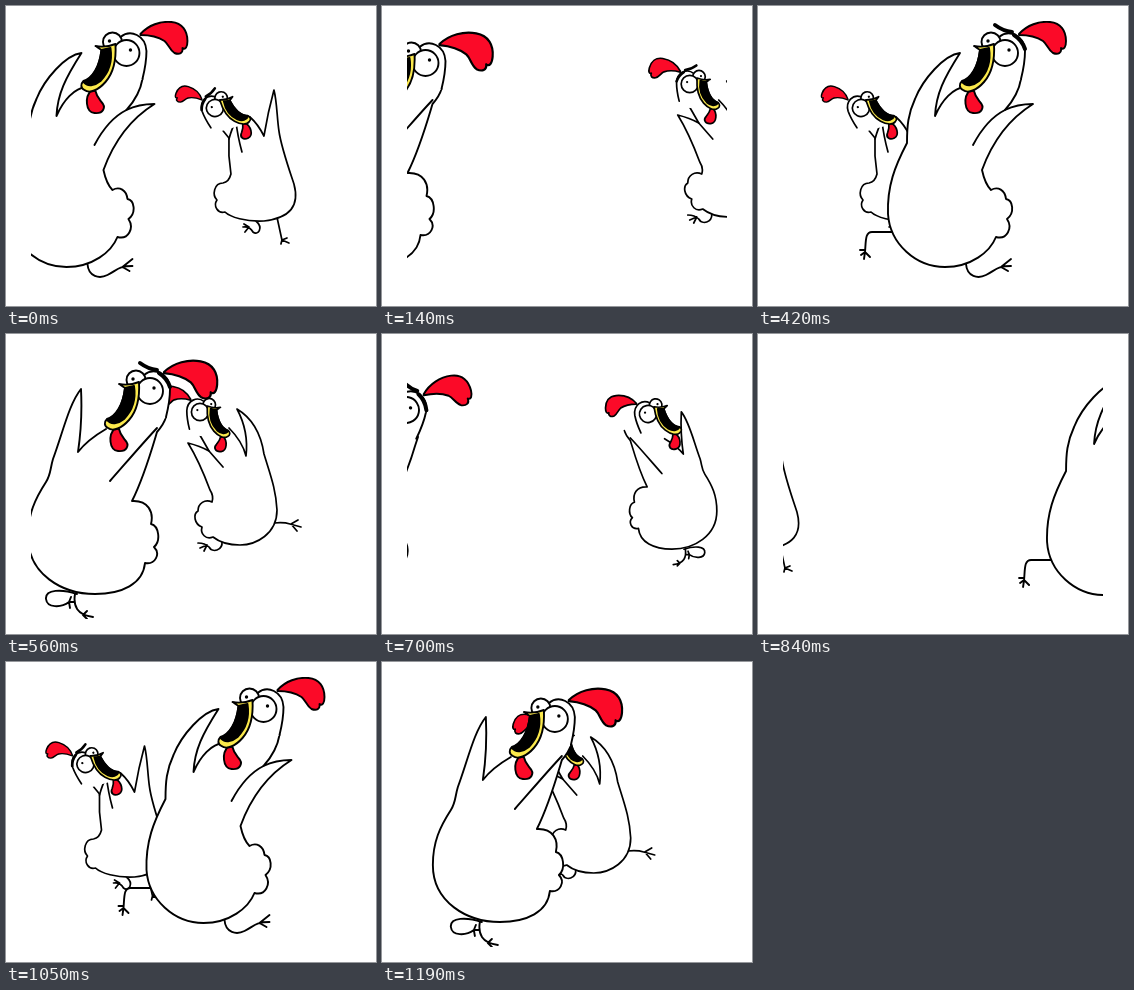
Animation of 370x300 px, one loop 1.26 s. Source, as an HTML page with a canvas:

```html
<!DOCTYPE html>
<html lang="en">
<head>
<meta charset="utf-8">
<title>Running chickens</title>
<style>
html, body { margin: 0; width: 100%; height: 100%; overflow: hidden; background: #fff; }
canvas { display: block; width: 370px; height: 300px; }
</style>
</head>
<body>
<canvas id="stage"></canvas>
<script>
const W = 370, H = 300, STEP = 70, COUNT = 18;
const RED = '#fb0a28', YELLOW = '#fbe94c', INK = '#000';
const canvas = document.getElementById('stage');
const ctx = canvas.getContext('2d');
const dpr = window.devicePixelRatio || 1;
canvas.width = W * dpr;
canvas.height = H * dpr;

const P = d => new Path2D(d);
const shape = (body, wing, legs) => ({ body: P(body), wing: P(wing), legs: P(legs) });

// Body outlines of the run cycle
const stride = shape(
  'M207,81 C195,82 184,94 177,110 C178,88 186,72 202,47 C186,49 165,73 157,93 C150,108 149,120 149,137 C137,160 129,180 130,208 C132,238 158,261 187,261 C213,261 232,246 238,231 C249,234 255,222 249,213 C257,207 255,194 248,193 C247,184 240,180 233,184 Q227,178 224,164 C232,142 246,116 275,98 C265,98 255,100 247,104 C256,94 261,85 263,73',
  'M247,104 C235,110 224,122 215,139',
  'M135,226 L114,226 C107,226 108,235 107,246 L103,249 M107,246 L106,253 M107,246 L112,251 M107,244 L102,244 M208,258 C209,271 220,273 228,269 C238,264 239,260 253,260 M243,261 L253,253 M243,261 L250,265');
const landing = shape(
  'M309,105 C298,112 290,120 282,132 C279,110 273,85 268,62 C263,80 262,105 255,130 C254,140 254,148 254,155 C240,175 232,195 232,212 C232,240 265,258 295,258 C318,258 335,252 341,246 C352,247 358,238 354,228 C361,222 360,208 352,204 C352,192 344,185 337,181 C347,162 358,140 366,112 L369,103',
  'M321,155 C330,138 340,118 350,98',
  'M259,252 Q258,265 254,279 L248,280 M254,279 L251,285 M254,279 L258,284 M290,258 C275,261 275,273 287,272 C295,272 297,267 306,268 M300,268 L301,264 M300,268 L304,271');
const push = shape(
  'M129,95 C117,102 108,109 101,118 C104,98 105,75 104,55 C92,70 86,98 76,125 C73,135 74,140 69,148 C58,165 51,180 51,203 C51,240 85,260 118,260 C145,260 166,250 168,229 C178,231 184,220 177,213 C184,207 182,192 174,190 C177,178 171,166 155,167 C167,143 174,118 180,98 Q187,90 189,83',
  'M133,147 C148,130 165,110 180,94',
  'M100,260 C85,255 68,255 69,265 C70,274 84,274 92,268 L97,268 M92,268 L94,263 M92,268 L93,274 M98,260 C96,272 100,281 116,283 M106,281 L110,277 M106,281 L110,285');
const crouch = shape(
  'M244,111 Q252,118 258,130 C261,112 265,95 268,84 C271,95 271,112 273,125 C275,140 282,160 288,178 C294,200 284,212 258,215 C240,216 224,211 219,206 C212,208 207,200 211,194 C206,189 208,177 217,177 Q223,176 225,168 L223,150 L223,132 L205,110',
  'M236,146 C233,135 231,125 230,115 Q226,122 223,133',
  'M271,211 L276,234 L283,237 M276,234 L275,238 M276,234 L281,232 M250,215 C258,222 252,230 247,226 Q244,220 237,221 M243,221 L239,226 M243,221 L238,218');
const leap = shape(
  'M223,94 C231,102 237,110 240,122 C242,105 239,90 231,75 C246,84 255,100 258,120 C264,140 270,155 271,176 C271,200 250,211 234,211 C222,211 212,207 207,203 C200,206 194,200 196,193 C188,190 187,180 192,177 C192,169 199,165 206,168 Q208,162 204,156 C198,140 192,125 182,109 Q194,112 203,117 L187,89',
  'M203,117 L217,133',
  'M268,189 Q278,188 284,190 L295,193 M285,190 L291,197 M285,190 L292,186 M216,207 C217,217 206,219 203,213 Q199,209 192,209 M201,211 L194,214 M201,211 L198,217');

// Head parts, centred on the large eye; the comb starts at its own root
const skull = 'M-6,-16 C4,-24 19,-18 20,-2 C20,10 18,18 16,26';
const head = {
  top: P(skull),
  fill: P(skull + ' L5,36 L-25,38 L-18,-10 Z'),
  comb: P('M0,0 C8,-9 20,-13 31,-12 C42,-11 47,-3 47,7 C47,13 45,16 42,14 C43,19 39,21 34,19 C29,16 28,10 24,7 C18,3 9,1 0,1 Z'),
  wattle: P('M-35,37 C-42,44 -41,59 -32,60 C-23,61 -20,54 -25,49 C-28,45 -30,43 -31,38 Z'),
  beak: P('M-31,-7 Q-21,-5 -11,-9 C-10,8 -13,20 -21,29 C-28,37 -37,41 -42,37 C-46,35 -46,31 -43,28 C-34,25 -27,14 -25,-3 Z'),
  mouth: P('M-25,-3 L-16,-5 C-14,8 -18,20 -26,28 C-32,33 -39,34 -43,29 C-34,25 -27,14 -25,-3 Z'),
  brows: P('M-10,-28 Q-2,-22 7,-21 M9,-18 Q17,-13 20,-4')
};

// map: scale x, scale y, shift x, shift y; head: x, y, turn, comb turn, comb size
const same = [1, 1, 0, 0];
const big = [
  { form: stride, dx: 0, map: same, head: [247, 47, 0, 0, 1] },
  { form: landing, dx: -111, map: same, head: [357, 76, 12, -25, 1] },
  { form: push, dx: 82, map: same, head: [173, 57, 0, 5, 1.15] }
];
const small = [
  { form: crouch, dx: 0, map: same, head: [209, 102, 20, -42, .85] },
  { form: push, dx: 190, map: [-.67, .67, 117, 41], head: [14, 80, 11, -11, 1] },
  { form: leap, dx: 22, map: same, head: [194, 78, 0, -15, 1] }
];

function paint(path, fill) {
  if (fill) { ctx.fillStyle = fill; ctx.fill(path); }
  ctx.stroke(path);
}

function eye(x, y, r, px, py) {
  const ring = new Path2D(), dot = new Path2D();
  ring.arc(x, y, r, 0, 7);
  dot.arc(px, py, 1.7, 0, 7);
  paint(ring, '#fff');
  ctx.fillStyle = INK;
  ctx.fill(dot);
}

function drawHead([x, y, turn, combTurn, combSize], scale, line, brows) {
  const rad = Math.PI / 180;
  ctx.save();
  ctx.translate(x, y);
  ctx.scale(scale < 1 ? -scale : 1, scale);
  ctx.rotate(turn * rad);
  ctx.lineWidth = line / scale;
  ctx.save();
  ctx.translate(14, -19);
  ctx.rotate(combTurn * rad);
  ctx.scale(combSize, combSize);
  paint(head.comb, RED);
  ctx.restore();
  ctx.fillStyle = '#fff';
  ctx.fill(head.fill);
  ctx.stroke(head.top);
  paint(head.wattle, RED);
  eye(-14, -11, 9.5, -17, -12);
  eye(0, 0, 13, 4, -3);
  paint(head.beak, YELLOW);
  paint(head.mouth, INK);
  if (brows) {
    ctx.lineWidth = 4;
    ctx.stroke(head.brows);
  }
  ctx.restore();
}

function chicken(pose, x, scale, brows) {
  const [sx, sy, tx, ty] = pose.map, line = scale < 1 ? 1.7 : 1.9;
  ctx.save();
  ctx.translate(x + pose.dx, 0);
  ctx.save();
  ctx.translate(tx, ty);
  ctx.scale(sx, sy);
  ctx.lineWidth = line / sy;
  ctx.stroke(pose.form.legs);
  paint(pose.form.body, '#fff');
  ctx.stroke(pose.form.wing);
  ctx.restore();
  drawHead(pose.head, scale, line, brows);
  ctx.restore();
}

function draw(n) {
  const phase = n % 3;
  ctx.setTransform(dpr, 0, 0, dpr, 0, 0);
  ctx.fillStyle = '#fff';
  ctx.fillRect(0, 0, W, H);
  ctx.beginPath();
  ctx.rect(25, 15, 320, 270);
  ctx.save();
  ctx.clip();
  ctx.strokeStyle = INK;
  ctx.lineCap = ctx.lineJoin = 'round';
  // the second lap runs on past the loop point
  const u = (n < 6 ? n + COUNT : n) - 15;
  const far = (x, brows) => chicken(small[phase], x, .66, brows);
  const near = (x, brows) => chicken(big[phase], x, 1, brows);
  if (n < 12) far(-106 + 42 * (n - 6), false);
  if (u > -6) far(-129.5 + 41.5 * u + .55 * u * u, true);
  if (n < 14) near(-55.5 * (n - 6), true);
  if (u > -7) near(10.5 - 47.6 * u + .64 * u * u, false);
  ctx.restore();
}

let shown = -1;
const start = performance.now();
function tick() {
  const n = Math.floor(Math.max(0, performance.now() - start) / STEP) % COUNT;
  if (n !== shown) draw(shown = n);
  requestAnimationFrame(tick);
}
tick();
</script>
</body>
</html>
```
